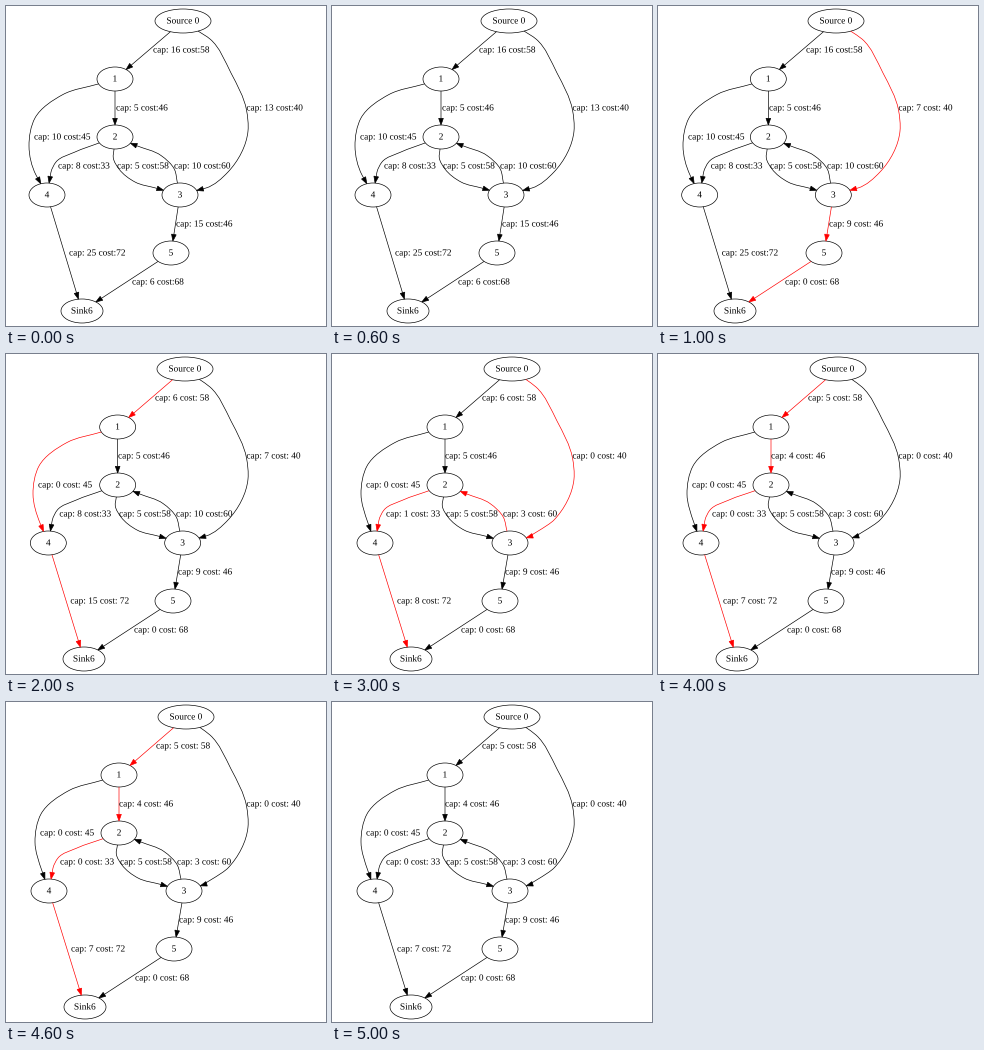
These frames come from a looping animation (320 px wide and 320 px high, 6000 ms). A matplotlib script:

```python
import numpy as np
import matplotlib.pyplot as plt
from matplotlib.animation import FuncAnimation
from matplotlib.patches import Ellipse, PathPatch, Polygon
from matplotlib.path import Path
from matplotlib.textpath import TextPath
from matplotlib.transforms import Affine2D

SIZE = 320
UNIT = 2 / 3               # pixels per layout point
LINE = UNIT
FONT = 14 * UNIT
RY = 18 * UNIT
TOP, ROW = 15, 58          # first rank and distance between ranks

plt.rcParams["font.family"] = "Liberation Serif"


class Node:
    def __init__(self, name, x, rank, rx=18, drift=3):
        self.name, self.x, self.rank = name, x, rank
        self.rx, self.drift = rx, drift


class Edge:
    def __init__(self, cap, cost, label_x, via=(), drift=3):
        self.cap, self.cost, self.label_x = cap, cost, label_x
        self.via, self.drift = via, drift


# drift: how far a part has moved right once the layout settles
NODES = [
    Node("Source 0", 177, 0, rx=28),
    Node("1", 109, 1, drift=4),
    Node("2", 109, 2, drift=4),
    Node("3", 174, 3, drift=4),
    Node("4", 41, 3, drift=2),
    Node("5", 165, 4),
    Node("Sink6", 76, 5, rx=21),
]

EDGES = {
    (0, 1): Edge(16, 58, 147),
    (0, 3): Edge(13, 40, 240.4, [(204, 33), (225, 67), (240.5, 104),
                                 (242, 125), (222, 166), (200, 182)], 0),
    (1, 2): Edge(5, 46, 110),
    (1, 4): Edge(10, 45, 28, [(57, 88.5), (29, 112), (23, 140),
                              (30, 169)], 6),
    (2, 4): Edge(8, 33, 52, [(69, 146), (50, 156), (45, 166)], 2),
    (2, 3): Edge(5, 58, 111, [(107.3, 152), (113, 163), (129, 176)]),
    (3, 2): Edge(10, 60, 168, [(168.5, 163.5), (155, 149.5)]),
    (3, 5): Edge(15, 46, 170),
    (4, 6): Edge(25, 72, 63, drift=2),
    (5, 6): Edge(6, 68, 126),
}

# augmenting paths with the flow sent along each
STEPS = [
    ((), 0),
    ((0, 3, 5, 6), 6),
    ((0, 1, 4, 6), 10),
    ((0, 3, 2, 4, 6), 7),
    ((0, 1, 2, 4, 6), 1),
    ((), 0),
]

fig = plt.figure(figsize=(SIZE / 72, SIZE / 72), dpi=72, facecolor="white")
ax = fig.add_axes([0, 0, 1, 1])


def settle(step):
    return min(step / 3, 1)


def rank_y(rank):
    return TOP + ROW * rank


def centre(node, step):
    return np.array([node.x + node.drift * settle(step), rank_y(node.rank)])


def border(node, step, toward):
    """Point where the ray from the node's centre leaves its ellipse."""
    mid = centre(node, step)
    ray = np.asarray(toward) - mid
    return mid + ray / np.hypot(*(ray / (node.rx, RY)))


def smooth(points):
    """Cubic Bezier path through the points, straight for two."""
    pts = np.array(points)
    gaps = np.hypot(*np.diff(pts, axis=0).T)
    slopes = np.gradient(pts, np.append(0, np.cumsum(gaps)), axis=0)
    verts = [pts[0]]
    for i, gap in enumerate(gaps):
        verts += [pts[i] + slopes[i] * gap / 3,
                  pts[i + 1] - slopes[i + 1] * gap / 3, pts[i + 1]]
    return Path(verts, [Path.MOVETO] + [Path.CURVE4] * (len(verts) - 1))


def write(x, rank, text, centred=False):
    glyphs = TextPath((0, 0), text, size=FONT)
    if centred:
        box = glyphs.get_extents()
        x -= (box.x0 + box.x1) / 2
    place = Affine2D().scale(1, -1).translate(x, rank_y(rank) + 0.27 * FONT)
    ax.add_patch(PathPatch(place.transform_path(glyphs), fc="black",
                           lw=0, zorder=3))


def path_edges(nodes):
    return set(zip(nodes, nodes[1:]))


def label(key, step):
    cap, gap = EDGES[key].cap, ""
    for nodes, flow in STEPS[:step + 1]:
        if key in path_edges(nodes):
            cap -= flow
            gap = " "
    return f"cap: {cap} cost:{gap}{EDGES[key].cost}"


def draw_node(node, step):
    mid = centre(node, step)
    ax.add_patch(Ellipse(mid, 2 * node.rx, 2 * RY, fc="none",
                         ec="black", lw=LINE))
    write(mid[0], node.rank, node.name, centred=True)


def draw_edge(key, step):
    edge = EDGES[key]
    tail, head = (NODES[n] for n in key)
    shift = edge.drift * settle(step)
    via = [np.array([x + shift, y]) for x, y in edge.via]
    start = border(tail, step, via[0] if via else centre(head, step))
    tip = border(head, step, via[-1] if via else centre(tail, step))

    along = tip - (via[-1] if via else start)
    along /= np.hypot(*along)
    base = tip - along * 10 * UNIT
    side = np.array([-along[1], along[0]]) * 3.5 * UNIT

    color = "red" if key in path_edges(STEPS[step][0]) else "black"
    ax.add_patch(PathPatch(smooth([start, *via, base]), fc="none",
                           ec=color, lw=LINE))
    ax.add_patch(Polygon([tip, base + side, base - side], fc=color,
                         ec=color, lw=LINE, joinstyle="miter"))
    write(edge.label_x + shift, (tail.rank + head.rank) / 2,
          label(key, step))


def draw(step):
    ax.clear()
    ax.set_xlim(0, SIZE)
    ax.set_ylim(SIZE, 0)
    ax.axis("off")
    for node in NODES:
        draw_node(node, step)
    for key in EDGES:
        draw_edge(key, step)
    return []


anim = FuncAnimation(fig, draw, frames=len(STEPS), init_func=lambda: draw(0),
                     interval=1000, repeat=True, repeat_delay=0, blit=False)
plt.show()
```
